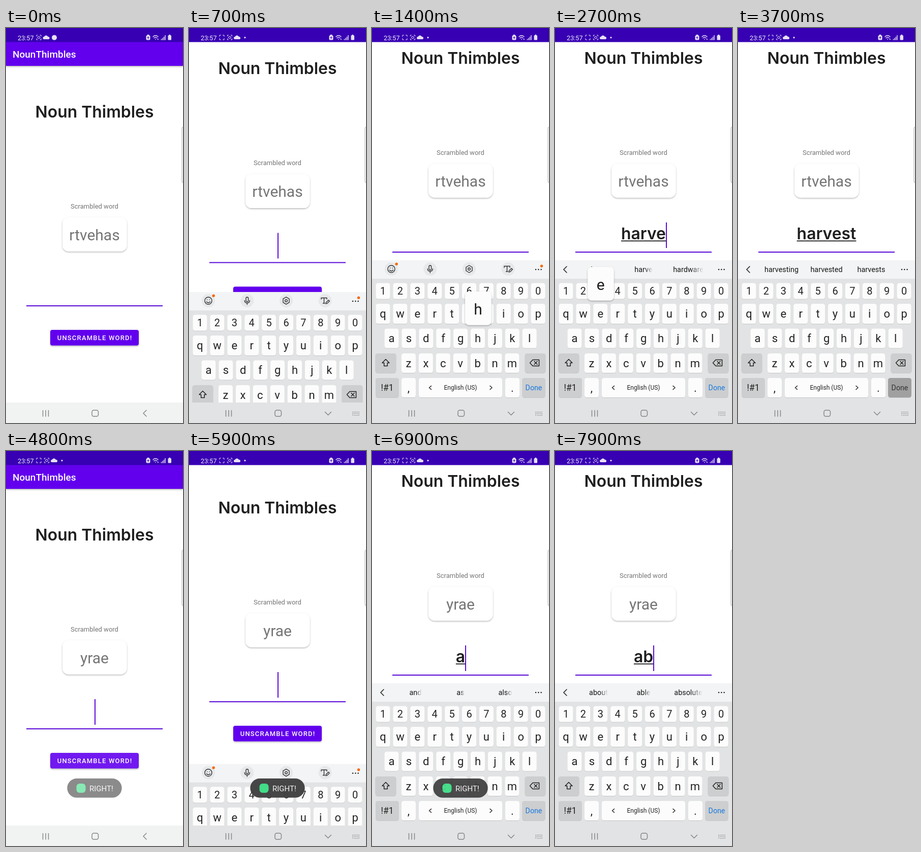
Recreate the animation shown at these times as an HTML page. Size 348 by 772 pixels, loop 8000 ms.

```html
<!DOCTYPE html>
<html lang="en">
<head>
<meta charset="utf-8">
<title>Word game</title>
<style>
  html, body { margin: 0; width: 100%; height: 100%; overflow: hidden; background: #fff; }
  svg { display: block; width: 100vw; height: 100vh; }
  text { font-family: Roboto, sans-serif; text-anchor: middle; white-space: pre; }
  .start { text-anchor: start; }
  .heavy { font: 600 31.9px Inter, sans-serif; fill: #1f1f1f; }
  .medium { font-weight: 500; fill: #fff; }
  .line { fill: none; stroke-linecap: round; stroke-linejoin: round; }
</style>
</head>
<body>
<svg viewBox="0 0 348 772" preserveAspectRatio="none">
  <defs>
    <filter id="shadow" x="-20%" y="-20%" width="140%" height="150%">
      <feDropShadow dx="0" dy="1.5" stdDeviation="1.4" flood-opacity=".3"/>
    </filter>
    <filter id="keyShadow" x="-20%" y="-20%" width="140%" height="150%">
      <feDropShadow dx="0" dy=".8" stdDeviation=".5" flood-opacity=".16"/>
    </filter>
    <linearGradient id="wipe">
      <stop stop-color="#161616"/>
      <stop stop-color="#161616" stop-opacity="0"/>
    </linearGradient>
  </defs>
  <rect width="348" height="772" fill="#fff"/>

  <g id="page">
    <rect y="20" width="348" height="54" fill="#6200ee" filter="url(#shadow)"/>
    <text class="start medium" x="13" y="58" font-size="19">NounThimbles</text>
    <text class="heavy" x="174" y="174.5">Noun Thimbles</text>
    <text x="174" y="353" font-size="13" fill="#757575">Scrambled word</text>
    <rect x="111" y="370" width="126.500" height="66.500" rx="12" fill="#fff" filter="url(#shadow)"/>
    <text id="scrambled" x="174" y="415" font-size="30" fill="#757575"></text>
    <text id="typed" class="heavy" x="174" y="518"></text>
    <rect id="underline" y="520.300" height="1.8" fill="#1f1f1f"/>
    <rect id="cursor" y="485" width="2" height="50" fill="#5a0ad8"/>
    <rect x="40" y="542" width="268" height="2" fill="#5a0ad8"/>
    <rect x="87" y="590" width="174" height="30.500" rx="4" fill="#6200ee" filter="url(#shadow)"/>
    <rect id="ripple" x="87" y="590" width="174" height="30.500" rx="4" fill="#fff"/>
    <text class="medium" x="174.600" y="610" font-size="13" letter-spacing="1.2">UNSCRAMBLE WORD!</text>
  </g>

  <rect width="348" height="27.500" fill="#3700b3"/>
  <g fill="#e6e0f5" stroke="#e6e0f5" stroke-width="0">
    <text class="start" x="23" y="23.500" font-size="12.700" fill="#f0ebfa">23:57</text>
    <path id="scan" class="line" stroke-width="1" d="M60 16.500v-2.500h2.500M66.500 14h2.500v2.500M69 20.500v2.500h-2.500M62.500 23h-2.500v-2.500"/>
    <g id="shifting">
      <path class="line" stroke-width="1" d="M60 16v-2h2M67 14h2v2M69 21v2h-2M62 23h-2v-2"/>
      <rect x="62.300" y="16.700" width="4.400" height="3.600" rx=".8" fill="none" stroke-width="1"/>
      <path d="M75 22a2.500 2.500 0 0 1 0-5a4 4 0 0 1 7.500 0a2.500 2.500 0 0 1 1 5z"/>
    </g>
    <circle id="badge" cx="95" cy="18.700" r="5"/>
    <circle id="more" cx="110" cy="18.700" r="1.600"/>
    <rect x="275.500" y="14.500" width="8" height="9" rx="2"/>
    <rect x="277.500" y="13" width="4" height="2"/>
    <path class="line" stroke="#3700b3" stroke-width="1.200" d="M278 18.500h3M279.500 17v4"/>
    <path class="line" stroke-width="1.400" d="M289 17q5-4.500 10 0M291 19.500q3-2.700 6 0M293.700 22h.5M298 22h1.500"/>
    <path class="line" stroke-width="1.700" d="M305.500 22v1M308 20v3M310.500 17.500v5.500M313 14.500v8.500" opacity=".85"/>
    <rect x="318.500" y="14.500" width="6.500" height="9" rx="1"/>
    <rect x="320.200" y="13" width="3" height="2"/>
  </g>

  <g id="keyboard">
    <rect y="454" width="348" height="37" fill="#f2f4f5"/>
    <rect y="490" width="348" height="282" fill="#e2e3e4"/>
    <g id="tools">
      <g id="discs" fill="#e6e8e9"></g>
      <g class="line" stroke="#303235" stroke-width="1.400">
        <circle cx="38" cy="471" r="7"/>
        <path d="M34.500 473q3.500 4 7 0M35.700 469v.4M40.300 469v.4"/>
        <rect x="112" y="464" width="4.600" height="9" rx="2.300"/>
        <path d="M109.300 470.500q0 5 5 5t5-5M114.300 475.500v3"/>
        <path d="M191 464l6 3.500v7l-6 3.500-6-3.500v-7z"/>
        <circle cx="191" cy="471" r="2.300"/>
        <path d="M260 468v-2.500h11v2.500M265.500 466v10M263.500 476h3.500M269 477l.6-2.700 4.700-4.600 2 2-4.700 4.700z"/>
      </g>
      <circle cx="48.200" cy="461.300" r="2.700" fill="#f26a0a"/>
      <circle cx="333.500" cy="465.300" r="2.700" fill="#f26a0a"/>
    </g>
    <g id="suggestions" font-size="14.400" fill="url(#wipe)">
      <path class="line" stroke="#222" stroke-width="1.600" d="M23 466l-6 6 6 6"/>
      <text x="85.500" y="477"></text>
      <text x="174" y="477"></text>
      <text x="262" y="477"></text>
    </g>
    <path class="line" stroke="#222" stroke-width="2.600" d="M322 472h0M327.300 472h0M332.600 472h0"/>
    <g id="keys" fill="#222"></g>
    <g class="line" stroke="#222" stroke-width="1.500">
      <path d="M27 647.500l7 7h-3.700v6h-6.600v-6h-3.700z"/>
      <path d="M316 648.500h12.500v12h-12.500l-5.500-6zM319 651.500l6 6M325 651.500l-6 6"/>
      <path d="M116.500 699.500l-4 3.500 4 3.500M232 699.500l4 3.500-4 3.500"/>
    </g>
    <g id="popup">
      <rect x="-25" y="-33" width="51.500" height="65.500" rx="8" fill="#fcfcfc" filter="url(#shadow)"/>
      <text x=".5" y="12" font-size="30" fill="#1c1c1c"></text>
    </g>
  </g>

  <rect id="nav" y="732" width="348" height="40"/>
  <g class="line" stroke="#858789" stroke-width="1.500">
    <path d="M72.500 747.500v11.500M78 747.500v11.500M83.500 747.500v11.500"/>
    <rect x="169" y="747" width="12.500" height="12" rx="3.500"/>
    <path id="back" d="M276 747l-6 6 6 6"/>
    <path id="hide" d="M267.500 750.500l6 6 6-6"/>
    <path id="switcher" stroke-width="1.700" stroke-dasharray="0 3" d="M322 750.500h14M322 753.500h14M322 756.500h2.500M325.500 757h7M334 756.500h2"/>
  </g>

  <g id="toast">
    <rect x="120.300" y="640" width="107.400" height="37.600" rx="18.800" fill="#414141"/>
    <rect x="138.500" y="650" width="18" height="18" rx="6" fill="#3ddc84"/>
    <text class="start" x="164" y="664.500" font-size="15" fill="#f4f4f4">RIGHT!</text>
  </g>

  <path d="M349 193q-3 0-3 4v102q0 4 3 4" fill="#fff" stroke="#aaa" stroke-width="1"/>
</svg>
<script>
const LOOP = 8000;
const SOLVED = 4600;   // answer accepted, next word appears
const PAN = -105;
const $ = id => document.getElementById(id);

// [commit time, letter]
const strokes = [[1450, 'h'], [1800, 'a'], [2080, 'r'], [2350, 'v'], [2620, 'e'],
  [2900, 's'], [3150, 't'], [6500, 'a'], [7450, 'b']];
const blinkResets = [550, ...strokes.map(s => s[0]), SOLVED, 5800].sort((a, b) => a - b);
const hints = [
  [1720, 'he', 'how', 'have'],
  [2030, 'has', 'have', 'had'],
  [2250, 'hard', 'har', 'hardly'],
  [2470, 'have', 'harv', 'hardware'],
  [2620, 'have', 'harve', 'hardware'],
  [3050, 'harvest', 'harves', 'harvested'],
  [3420, 'harvesting', 'harvested', 'harvests'],
  [SOLVED, '', '', ''],
  [6820, 'and', 'as', 'also'],
  [7760, '', '', ''],
  [7820, 'about', 'able', 'absolute'],
];
const boardSteps = [[0, 0], [450, 0], [800, 1], [3750, 1], [4100, 0], [5720, 0], [6080, 1], [LOOP, 1]];
const toastSteps = [[0, 0], [SOLVED, 0], [4920, .97], [6890, .97], [7320, 0], [LOOP, 0]];
const rippleSteps = [[0, 0], [4350, 0], [4500, .2], [4650, .16], [5050, 0], [LOOP, 0]];

const smooth = p => p * p * (3 - 2 * p);
const linear = p => p;

function sample(steps, t, ease = linear) {
  const i = Math.max(1, steps.findIndex(s => s[0] > t));
  const [t0, a] = steps[i - 1], [t1, b] = steps[i];
  return a + (b - a) * ease((t - t0) / (t1 - t0));
}
const lastBefore = (list, t) => list.filter(item => (item[0] ?? item) <= t).pop();
const show = (id, on) => $(id).setAttribute('visibility', on ? 'inherit' : 'hidden');
const move = (id, x, y) => $(id).setAttribute('transform', `translate(${x} ${y})`);

// Keyboard layout
const keyAt = {};
function addKey(label, x, y, w, h, size, fill = '#fcfcfc', id = '') {
  keyAt[label] = [x, y];
  $('keys').insertAdjacentHTML('beforeend',
    `<rect ${id && `id="${id}Key"`} x="${x - w / 2}" y="${y - h / 2}" width="${w}" height="${h}" rx="4.5"
      fill="${fill}" filter="url(#keyShadow)"/>
     <text ${id && `id="${id}Text"`} x="${x}" y="${y + size * .36}" font-size="${size}">${label}</text>`);
}
function addRow(letters, x, y, h, size) {
  [...letters].forEach((c, i) => addKey(c, x + i * 33.9, y, 28, h, size));
}
addRow('1234567890', 21.5, 514, 31, 20);
addRow('qwertyuiop', 21.5, 558.5, 39, 22);
addRow('asdfghjkl', 38.5, 606.5, 38, 22);
addRow('zxcvbnm', 72, 655, 38, 22);
const GREY = '#cdcecf';
addKey('', 27, 655, 41, 38, 1, GREY);
addKey('', 321, 655, 41, 38, 1, GREY);
addKey('!#1', 30, 703, 46, 38, 17.5, GREY);
addKey(',', 72, 703, 28, 38, 22);
addKey('English (US)', 174, 703, 164, 38, 12);
addKey('.', 276, 703, 28, 38, 22);
addKey('Done', 318, 703, 46, 38, 14.2, GREY, 'done');

$('discs').innerHTML = [38, 114.3, 191, 267.5].map(x => `<circle cx="${x}" cy="471" r="13"/>`).join('');

const [solid, clear] = document.querySelectorAll('#wipe stop');
const hintTexts = document.querySelectorAll('#suggestions text');
const popupText = document.querySelector('#popup text');

function drawInput(t) {
  const since = t < SOLVED ? 0 : SOLVED;
  const word = strokes.filter(([at]) => at >= since && at <= t).map(s => s[1]).join('');
  $('scrambled').textContent = since ? 'yrae' : 'rtvehas';
  $('typed').textContent = word;
  const width = word ? $('typed').getComputedTextLength() : 0;
  $('underline').setAttribute('x', 174 - width / 2);
  $('underline').setAttribute('width', width);
  $('cursor').setAttribute('x', Math.round(173.7 + width / 2));
  const reset = lastBefore(blinkResets, t);
  show('cursor', reset !== undefined && (t - reset) % 1000 < 500);
}

function drawKeyboard(t) {
  const open = sample(boardSteps, t, smooth);
  move('page', 0, PAN * open);
  move('keyboard', 0, 318 * (1 - open));
  show('keyboard', open > 0);
  const up = open > .5;
  $('nav').setAttribute('fill', up ? '#e2e3e4' : '#f1f3f2');
  show('back', !up);
  show('hide', up);
  show('switcher', up);

  const typing = (t > 1620 && t < SOLVED) || t > 6640;
  show('tools', !typing);
  show('suggestions', typing);
  const [start, ...words] = lastBefore(hints, t) || [0, '', '', ''];
  hintTexts.forEach((el, i) => el.textContent = words[i]);
  const edge = Math.min(1, (t - start) / 110) * 1.6 - .6;
  solid.setAttribute('offset', Math.max(0, edge));
  clear.setAttribute('offset', Math.max(0, Math.min(1, edge + .45)));
  clear.setAttribute('stop-opacity', edge >= 1 ? 1 : 0);

  const stroke = strokes.find(([at]) => t >= at - 100 && t < at + 110);
  show('popup', stroke);
  if (stroke) {
    const [x, y] = keyAt[stroke[1]];
    popupText.textContent = stroke[1];
    move('popup', x, y - 58.5);
  }
  const pressed = t >= 3580 && t < 3900;
  $('doneKey').setAttribute('fill', pressed ? '#a0a0a0' : GREY);
  $('doneText').setAttribute('fill', pressed ? '#333' : '#1779e0');
}

function drawStatus(t) {
  const later = t >= 150;
  show('scan', later);
  show('more', later);
  show('badge', !later);
  move('shifting', later ? 15.5 : 0, 0);
}

function draw(t) {
  drawStatus(t);
  drawInput(t);
  drawKeyboard(t);
  $('toast').setAttribute('opacity', sample(toastSteps, t));
  $('ripple').setAttribute('opacity', sample(rippleSteps, t));
}

const begin = performance.now();
function tick() {
  draw((performance.now() - begin) % LOOP);
  requestAnimationFrame(tick);
}
tick();
</script>
</body>
</html>
```
